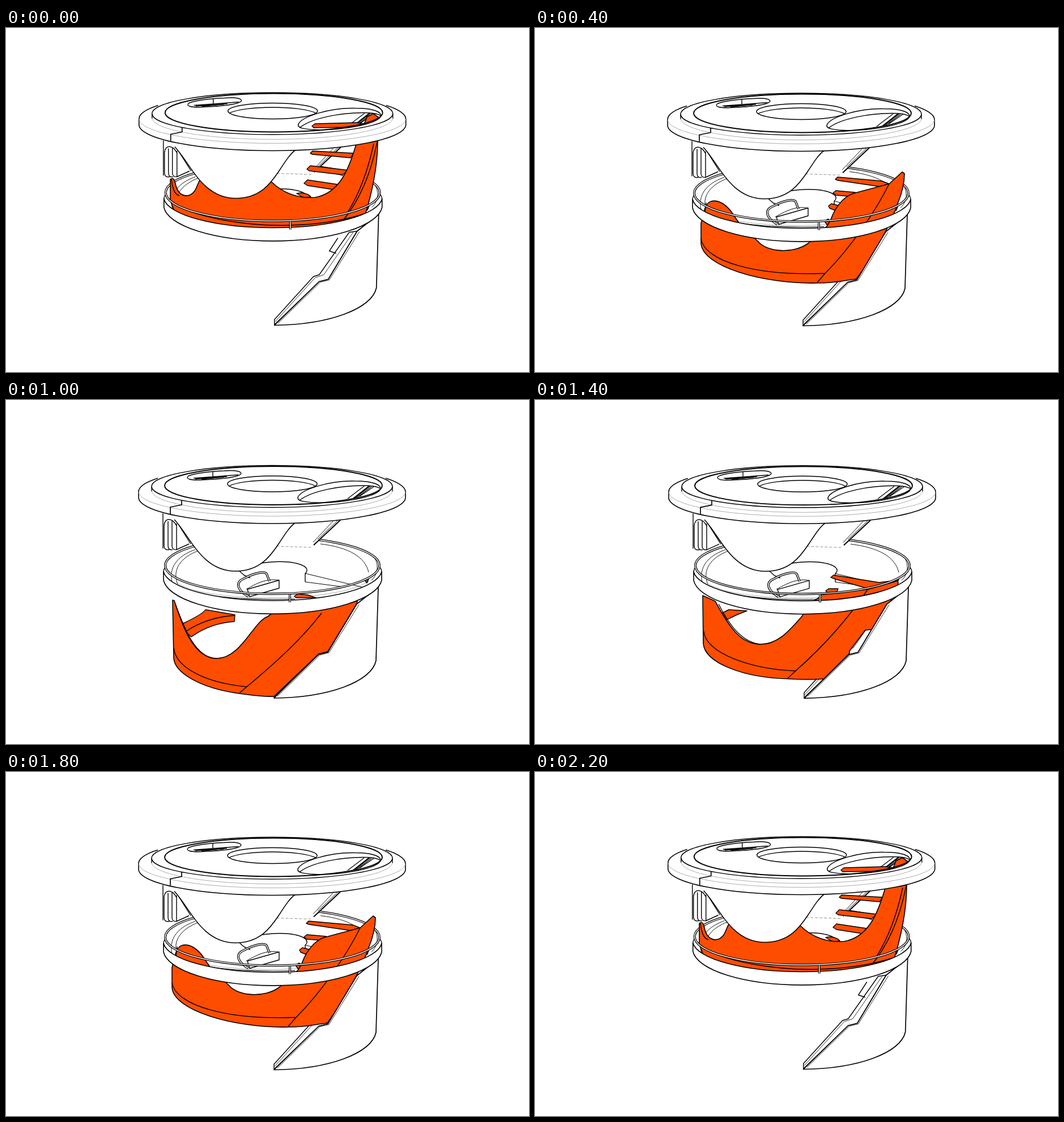
Animation, 923 px wide and 607 px high, one loop 2400 ms. Source, as an HTML page with a canvas:

```html
<!DOCTYPE html>
<html lang="en">
<head>
<meta charset="utf-8">
<title>Rotating cylinder insert</title>
<style>
  html, body { margin: 0; width: 100%; height: 100%; overflow: hidden; background: #fff; }
  canvas { display: block; width: 923px; height: 607px; }
</style>
</head>
<body>
<canvas id="stage" width="923" height="607"></canvas>
<script>
const ctx = document.getElementById('stage').getContext('2d');
const ORANGE = '#ff4d00', STEP = 200, LOOP = 2400;

function shape(d, { fill, line = '#000', width = 1.4, rule = 'nonzero', dash = [] } = {}) {
  const path = new Path2D(d);
  if (fill) { ctx.fillStyle = fill; ctx.fill(path, rule); }
  if (!line) return;
  ctx.strokeStyle = line;
  ctx.lineWidth = width;
  ctx.setLineDash(dash);
  ctx.stroke(path);
}
const white = (d, width = 1.4) => shape(d, { fill: '#fff', width });
const blank = d => shape(d, { fill: '#fff', line: null });
const faint = d => shape(d, { line: '#999', width: 0.8 });
const oval = (cx, cy, rx, ry) =>
  `M${cx - rx} ${cy}a${rx} ${ry} 0 1 1 ${2 * rx} 0a${rx} ${ry} 0 1 1 ${-2 * rx} 0Z`;
const tube = d => {
  shape(d, { width: 4 });
  shape(d, { line: '#fff', width: 1.5 });
};

// Poses of the insert, from raised to fully lowered.
const poses = [
  {
    shift: [0.7, -1.5],
    body: 'M290 267C296 262 298 270 300 279C306 299 324 301 334 286L341 270L360 260H450L468 271C490 293 518 301 545 299C588 292 605 250 618 205L637 157L648 151L658 158L656 200C656 245 645 295 633 332L620 352L500 366L400 360L300 330L290 305Z',
    lines: 'M655 201C643 262 620 310 592 343M649 204C638 255 622 295 603 325M292 267C294 285 298 294 306 296M293 306C330 336 430 350 500 348C550 347 590 341 632 328',
    steps: [
      'M540 173L545 169L618 167L632 169L618 175L543 176Z',
      'M537 221L541 217L614 221L608 229L541 223Z',
      'M531 249L537 243L604 251L594 259L535 252Z',
      'M526 274L532 268L592 277L577 285L532 278Z',
      'M513 292C523 289 534 293 538 298L526 300Z'
    ]
  },
  {
    shift: [0, -1],
    body: 'M291 310C300 296 318 290 338 284C352 278 365 284 380 298C410 335 450 350 490 348C545 342 575 290 592 266L645 225L655 205L658 210C660 260 645 300 632 330C625 350 617 362 606 378L590 388C560 400 520 406 480 406C390 406 296 380 292 335Z',
    lines: 'M645 225C628 285 598 345 562 384L545 401M292 327C300 365 400 393 562 384',
    steps: [
      'M536 217L541 213L640 220L631 226L541 219Z',
      'M533 243L538 239L622 248L609 254L538 246Z',
      'M528 270L533 265L592 271L584 279L533 273Z',
      'M522 293L528 289L574 294L566 301L527 298Z'
    ]
  },
  {
    shift: [0, -0.5],
    body: 'M299 322C303 300 325 299 345 322L362 347L393 376C410 397 458 398 482 380L515 350L522 338C533 307 552 294 565 291L625 275L648 254L652 257C652 275 647 293 640 310C630 340 600 400 567 443L552 445C530 449 515 450 498 450C400 452 295 420 293 380V345Z',
    lines: 'M625 275C604 318 560 385 512 433L498 449M293 372C300 412 390 438 512 433M302 308L300 324',
    steps: [
      'M530 267L534 263L612 270L625 275L610 280L535 269Z',
      'M526 291L531 287L565 290L556 297L531 295Z',
      'M518 314L523 310L539 314L530 322L520 318Z',
      'M511 341L517 337L522 340L516 348Z'
    ]
  },
  {
    shift: [0.7, 0],
    body: 'M294 345L300 332C312 330 325 350 338 370C365 405 390 412 418 412C445 412 465 395 484 378L510 345C525 325 545 320 575 312L607 302L645 287L648 290C645 310 640 335 622 362L575 430L552 440L538 470C515 473 495 473 472 472C385 472 297 445 295 405Z',
    lines: 'M607 302C582 350 535 410 486 456L472 471M295 390C300 428 385 458 486 456',
    steps: [
      'M526 290L530 287L612 297L607 303L532 294Z',
      'M520 314L525 311L548 315L540 321L523 319Z'
    ]
  },
  {
    shift: [2, 0.3],
    body: 'M296 345L318 355C345 405 365 431 398 431C430 431 450 405 470 383L490 356L502 348V344L588 334L640 319L641 323C635 340 628 352 626 360L594 405L583 406L555 443V447L510 492C485 494 465 493 446 492C370 490 300 465 297 430Z',
    lines: 'M588 333C560 375 520 425 460 478L446 491M298 408C300 446 380 475 460 478M324 360C346 403 368 428 398 431',
    steps: [
      'M522 313L527 309L607 322L640 318L588 333L530 316Z',
      'M513 337L518 333L535 333L532 340L517 340Z',
      'M330 376L342 370L374 372C360 377 349 382 338 388Z'
    ]
  },
  {
    shift: [0, 0],
    body: 'M294 353L297 354C310 395 330 456 372 456C415 456 437 390 462 382L485 365L620 355L619 360L568 444L552 448L473 523C450 524 430 520 412 518C340 508 297 480 296 455Z',
    lines: 'M557 376C520 424 475 464 425 506L412 517M296 437C300 476 360 500 425 506M299 360C314 401 334 456 372 456',
    steps: [
      'M317 409L311 395C330 386 348 377 352 370L404 379L403 391C370 393 345 405 327 418Z',
      'M318 408C345 390 375 382 404 380',
      'M509 346L515 342L533 344L547 349H512Z'
    ]
  }
];

// One entry per 200 ms; the lowest pose rests for two.
const order = [0, 1, 2, 3, 4, 5, 5, 4, 3, 2, 1, 0];

function drawTrayBack() {
  // inner thickness of the lower shell
  white('M605 362L552 437L542 440L473 516V525L552 449L568 445L619 360Z');
  shape('M612 362L560 437L545 442L474 520', { width: 0.8 });
  shape('M585 372L570 395L582 399');

  blank(oval(470, 296, 190, 52));
  shape('M293 321C286 290 310 272 334 264M303 325C291 295 314 274 345 264M555 254C605 260 634 277 640 304M645 318C658 306 657 288 650 278', { width: 0.9 });
  faint('M300 321C340 357 580 360 640 320');
  shape('M345 342C390 351 460 353 510 351', { width: 1.1 });
  tube('M281 292A189 50 0 0 1 659 292');

  shape('M410 301C420 290 470 283 500 286C530 290 536 299 528 306V321M411 301L420 309L431 314');
  shape('M528 306L640 333M528 321L597 330', { width: 1 });
  white('M426 334L482 318V332L430 347Z');
  shape('M424 334C448 320 463 315 482 318', { width: 1 });
  tube('M428 347C404 333 407 320 420 315C440 304 457 302 460 307L465 320');
  shape('M632 317L640 316L637 323Z', { fill: '#555' });
}

function drawUpperBack() {
  blank('M277 198V262L282 265H298L312 259L325 254L301 222V200Z');
  shape('M277 200V262M301 218V264L323 254M304 219L326 254');
  shape('M279 256V222C280 206 294 208 301 222M279 256Q279 266 288 264M286 214V256Q286 266 294 264M293 213V258Q294 265 301 264');
  blank('M510 210L590 212L543 257L475 258L462 262L470 235Z');
  shape('M590 212L543 256', { width: 2 });
  shape('M585 213L550 246M577 214L542 251', { width: 0.9 });
  shape('M462 262L475 258L540 260', { line: '#777', width: 0.8, dash: [5, 3] });
  // struts seen through the side opening
  shape('M603 174L632 152M612 174L640 152M618 173L645 153M624 170L649 153', { width: 1.2 });
  shape('M615 173L642 152', { width: 2 });
}

function drawInsert({ body, lines, steps }) {
  for (const d of steps) {
    shape(d, { fill: d.endsWith('Z') ? ORANGE : undefined });
  }
  shape(body, { fill: ORANGE, width: 1.6 });
  shape(lines);
}

function drawShellFront() {
  white('M657 330L653 460C645 497 570 525 473 526L552 449L568 445L619 360Z', 1.7);
  shape('M623 361L570 446L554 450L479 523', { width: 0.8 });
}

function drawTrayFront() {
  white('M278 303V318A193 64 0 0 0 663 318V303A193 55 0 0 1 278 303Z', 1.6);
  shape('M278 304Q278 297 283 294M663 304Q663 297 658 294');
  tube('M281 292A189 50 0 0 0 659 292');
  tube('M501 343V357');
}

function drawLid() {
  blank('M297 200V211L510 217V200Z');
  white('M297 211C325 240 345 302 405 302C448 302 467 275 481 254C491 239 500 224 510 217', 1.6);

  const slot = 'M322 134C335 129 362 126 385 125C408 123 418 127 414 131C408 137 370 140 345 141C325 142 316 139 322 134Z';
  const centre = oval(470, 148, 79, 14);
  const side = 'M515 172C520 158 570 142 615 143C650 143 668 151 658 161C645 172 590 183 545 181C525 180 514 178 515 172Z';
  const flange = 'M234 162V172A235.5 46 0 0 0 705 172V162A235.5 46 0 0 0 234 162Z';
  shape(flange + slot + centre + side, { fill: '#fff', line: null, rule: 'evenodd' });

  shape('M268 138C246 145 234 153 234 162V172A235.5 46 0 0 0 705 172V162C705 153 690 144 670 138', { width: 1.6 });
  faint('M234 162A235.5 43 0 0 0 705 162M257 160A212.5 38 0 0 0 682 160');
  shape(oval(469.5, 152.5, 212.5, 37));
  shape('M257 153V161M682 153V161');
  shape(oval(472, 151, 192, 34), { width: 1.9 });
  shape('M290 201V189L310 185V177', { width: 1.7 });

  shape(slot);
  shape('M365 126V135M331 138L385 134L410 132M345 140L390 135');
  shape('M334 139L384 136', { width: 2 });
  shape(centre, { width: 1.5 });
  shape('M393 152C420 138 520 138 547 152');
  shape(side, { width: 1.5 });
  shape('M518 177C540 160 590 151 630 151Q653 151 660 156');
}

function drawPose(pose) {
  const shifted = (...parts) => {
    ctx.save();
    ctx.translate(...pose.shift);
    parts.forEach(part => part());
    ctx.restore();
  };
  ctx.fillStyle = '#fff';
  ctx.fillRect(0, 0, 923, 607);
  shifted(drawTrayBack, drawUpperBack);
  drawInsert(pose);
  shifted(drawShellFront, drawTrayFront, drawLid);
}

ctx.lineJoin = 'round';
const start = performance.now();
let shown = -1;
function tick(now) {
  const time = Math.max(0, now - start) % LOOP;
  const index = order[Math.floor(time / STEP)];
  if (index !== shown) drawPose(poses[shown = index]);
  requestAnimationFrame(tick);
}
tick(start);
</script>
</body>
</html>
```
